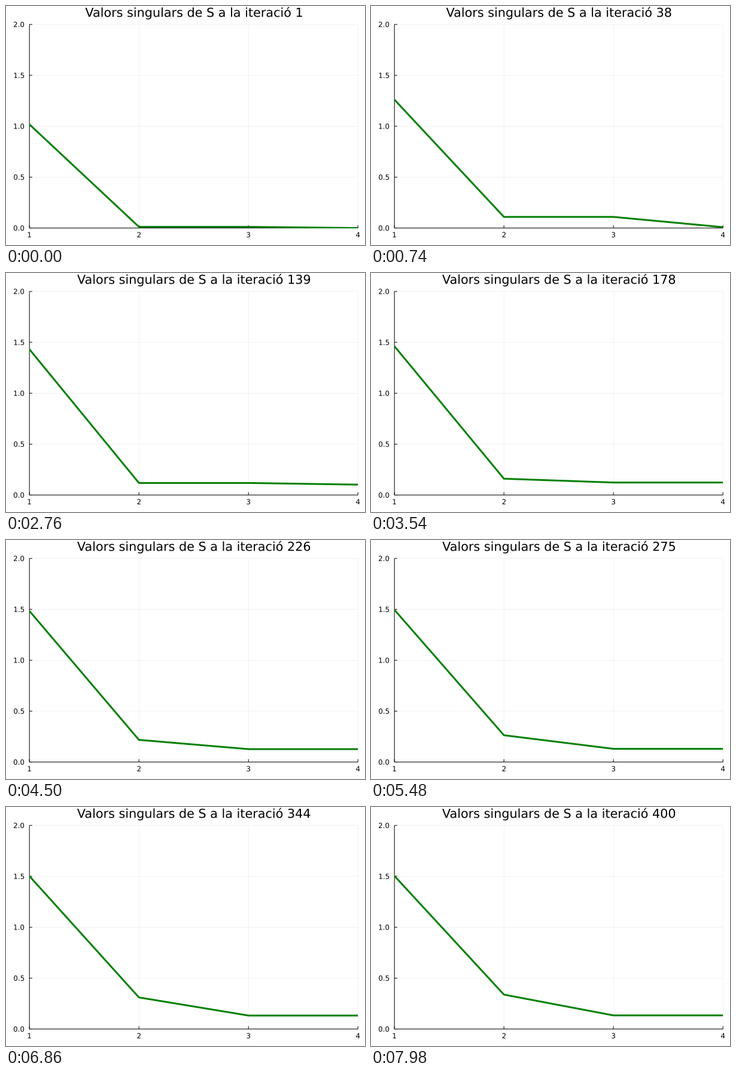
A matplotlib script for the animation above (8000 ms loop, 600 px wide and 400 px high).

```python
import numpy as np
import matplotlib.pyplot as plt
from matplotlib.animation import FuncAnimation
from matplotlib.patches import PathPatch, Rectangle
from matplotlib.textpath import TextPath
from matplotlib.transforms import Affine2D

W, H, DPI = 600, 400, 100
STEPS, STEP_MS = 400, 20
LEFT, RIGHT, TOP, BOTTOM = 39.15, 588.19, 30.87, 371.61
PX = 72 / DPI  # one pixel in points
TICK, TICK_FONT, TITLE_FONT = 4.72, 11.85, 20.74

plt.rcParams["font.family"] = "DejaVu Sans"


def to_x(k):
    return LEFT + (k - 1) * (RIGHT - LEFT) / 3


def to_y(v):
    return BOTTOM - v * (BOTTOM - TOP) / 2


def singular_values(n):
    """Four singular values after n iterations, largest first."""
    fast = np.exp(-0.11 * n)
    main = 1.505 - np.exp(-(1.044 + 0.00944 * n + 1.34e-5 * n * n)) - 0.154 * fast
    late = 1 - np.exp(-0.007 * max(n - 90, 0))
    pair = 0.111 * (1 - fast) + 0.026 * late
    # the weakest mode idles near zero, then takes off and overtakes the pair
    floor = 0.009 * (1 - np.exp(-0.08 * (n - 1)))
    lift = 0.42 - 0.655 * np.exp(-0.0052 * n) - floor
    slow = floor + (lift + np.hypot(lift, 0.008)) / 2
    return np.sort([main, pair, pair, slow])[::-1]


fig = plt.figure(figsize=(W / DPI, H / DPI), dpi=DPI, facecolor="white")
ax = fig.add_axes([0, 0, 1, 1])
ax.set_xlim(0, W)
ax.set_ylim(H, 0)
ax.axis("off")


def rule(x, y, width=1.0, alpha=1.0):
    ax.plot(x, y, color="black", lw=width * PX, alpha=alpha, snap=False,
            zorder=2, solid_capstyle="butt")


def glyphs(x, y, text, size, anchor=0.5):
    """Outline of text on baseline y; anchor 0.5 centres it, 1 ends it at x."""
    path = TextPath((0, 0), text, size=size)
    box = path.get_extents()
    shift = x - box.x0 - anchor * box.width
    return Affine2D().scale(1, -1).translate(shift, y).transform_path(path)


def label(*args):
    patch = PathPatch(glyphs(*args), fc="black", lw=0, snap=False, zorder=2)
    return ax.add_patch(patch)


for k in range(1, 5):
    x = to_x(k)
    rule([x, x], [TOP, BOTTOM], 0.5, 0.1)
    rule([x, x], [BOTTOM, BOTTOM - TICK])
    label(x, 387.15, str(k), TICK_FONT)

for v in np.arange(0, 2.1, 0.5):
    y = to_y(v)
    rule([LEFT, RIGHT], [y, y], 0.5, 0.1)
    rule([LEFT, LEFT + TICK], [y, y])
    label(LEFT - 9, y + 4.32, f"{v:.1f}", TICK_FONT, 1)

rule([LEFT, LEFT], [TOP, BOTTOM])
rule([LEFT, RIGHT], [BOTTOM, BOTTOM])


def title_path(n):
    text = f"Valors singulars de S a la iteració {n}"
    return glyphs((LEFT + RIGHT) / 2, 18.14, text, TITLE_FONT)


title = ax.add_patch(PathPatch(title_path(1), fc="black", lw=0, snap=False))
curve, = ax.plot([], [], color="#008000", lw=3 * PX, zorder=3, snap=False,
                 solid_joinstyle="miter", solid_capstyle="butt")
curve.set_clip_path(Rectangle((39, 30), 550, 342, transform=ax.transData))
xs = to_x(np.arange(1, 5))


def draw(i):
    n = i + 1
    curve.set_data(xs, to_y(singular_values(n)))
    title.set_path(title_path(n))
    return curve, title


anim = FuncAnimation(fig, draw, frames=STEPS, interval=STEP_MS,
                     repeat=True, repeat_delay=0, blit=False)
plt.show()
```
